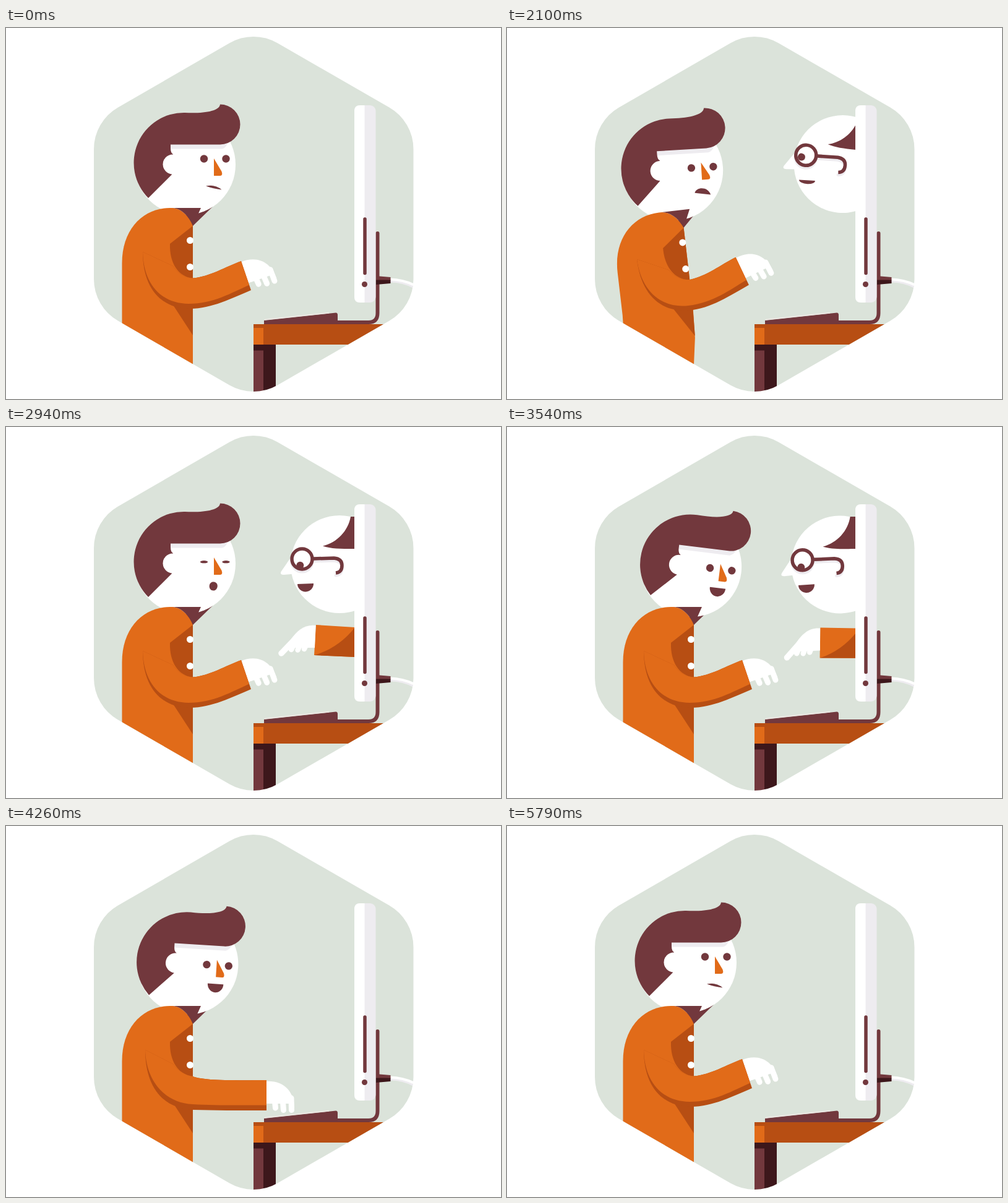
An HTML page that plays this animation: 800 by 600 pixels, repeating every 5.82 s.

```html
<!DOCTYPE html>
<html lang="en">
<head>
<meta charset="utf-8">
<title>Help from the screen</title>
<style>
  html, body { margin: 0; width: 100%; height: 100%; overflow: hidden; background: #fff; }
  svg { display: block; width: 800px; height: 600px; }
  .white { fill: #fff; }
  .pale { fill: #eeecf0; }
  .orange { fill: #e16b19; }
  .rust { fill: #b74e13; }
  .brown { fill: #72383d; }
  .dark { fill: #3d171b; }
  .line { fill: none; stroke: #72383d; stroke-linecap: round; }
  .soft { fill: none; stroke: #eeecf0; stroke-linecap: round; }
  .finger { fill: none; stroke: #fff; stroke-linecap: round; }
</style>
</head>
<body>
<svg viewBox="0 0 800 600">
  <defs>
    <clipPath id="hex">
      <path d="M361 24.5 A78 78 0 0 1 439 24.5 L619.5 128.5 A78 78 0 0 1 658.5 196 V406 A78 78 0 0 1 619.5 473.5 L439 577.5 A78 78 0 0 1 361 577.5 L181 473.5 A78 78 0 0 1 142 406 V196 A78 78 0 0 1 181 128.5 Z"/>
    </clipPath>
    <clipPath id="screen"><rect width="564" height="600"/></clipPath>
    <clipPath id="lens"><circle cx="478.5" cy="213.5" r="16"/></clipPath>
  </defs>

  <g clip-path="url(#hex)">
    <rect width="800" height="600" fill="#dbe3da"/>

    <!-- desk -->
    <path class="orange" d="M400 479H416V512H400Z"/>
    <path class="rust" d="M400 479H680V512H416V485H400Z"/>
    <path class="brown" d="M400 512H416V600H400Z"/>
    <path class="dark" d="M400 512H436V600H416V521.5H400Z"/>

    <!-- helper -->
    <g clip-path="url(#screen)">
      <g id="helper">
        <path class="white" d="M463 207L444.5 234Q442 239 449 239L472 237Z"/>
        <circle class="white" cx="539" cy="222" r="79"/>
        <path class="brown" d="M512 192.500C535 187 553 168 557 145L700 145V197H563C540 197 525 197 512 192.500Z"/>
        <g id="frameShade" class="soft" stroke-width="5" transform="translate(0 4)">
          <circle cx="478.500" cy="213.500" r="16.500"/>
          <path d="M497 213L530 212Q543 213 543 224Q543 235 533 236"/>
        </g>
        <circle class="white" cx="478.500" cy="213.500" r="16.500"/>
        <g clip-path="url(#lens)"><circle id="pupil" class="brown" r="6"/></g>
        <g class="line" stroke-width="5.500">
          <circle cx="478.500" cy="213.500" r="16.500"/>
          <path d="M497 213L530 212Q543 213 543 224Q543 235 533 236" stroke-linecap="butt"/>
        </g>
        <path id="helperMouth" class="brown"/>
      </g>
      <g id="pointer">
        <path class="orange" d="M501 320L564 324L700 332V380L564 372L498 369Z"/>
        <path class="rust" d="M498 369Q537 358 564 324L700 310V380L564 372Z"/>
        <path class="white" d="M500.500 321C482 319 471 329 460 344L464 357L499 357Z"/>
        <path class="finger" stroke-width="9.500" d="M470 340L445 366"/>
        <path class="finger" stroke-width="8.500" d="M468 346L461 360M478 346L471.500 360.500M488 346L482 359"/>
      </g>
    </g>

    <!-- computer -->
    <path class="line" stroke-width="6" d="M536 476H586Q600.500 476 600.500 461V332"/>
    <path class="brown" d="M417 479V473L533 460.500Q536 460.500 536 464V473H560V479Z"/>
    <path d="M418 471.500L522 460.500" stroke="#ebe7e2" stroke-width="2"/>
    <rect class="pale" x="563" y="125" width="34.500" height="319" rx="9"/>
    <path class="white" d="M579.500 125H572Q563 125 563 134V435Q563 444 572 444H579.500Z"/>
    <path class="line" stroke-width="5.500" d="M580 309V396.500"/>
    <circle class="brown" cx="579.500" cy="414.500" r="4.500"/>
    <path class="soft" stroke-width="5" d="M621 409Q643 409 662 420"/>
    <path fill="none" stroke="#fff" stroke-width="4" d="M621 406.500Q643 407 662 417"/>
    <path class="brown" d="M598 401L621.500 403V408H598Z"/>
    <path class="dark" d="M598 407.500H621.500V413L598 415Z"/>

    <!-- worker -->
    <path id="collarBack" class="brown"/>
    <g id="head">
      <circle class="white" cx="289.500" cy="221" r="81.500"/>
      <path class="pale" d="M266 187H358Q355 194 349 195.500H266Z"/>
      <path class="brown" d="M346 188.500A32.500 32.500 0 0 0 346 123.500C345 135 318 138.500 289 137A81 81 0 0 0 230 275L268 237L270 204Q266 202 266 194V188.500Z"/>
      <circle class="white" cx="269.500" cy="220.500" r="16"/>
      <path class="orange" d="M336 211L348.500 232Q351 239 346 239H336Z"/>
      <ellipse id="eyeL" class="brown" cx="320" rx="6.200"/>
      <ellipse id="eyeR" class="brown" cx="355.500" rx="6.200"/>
      <path id="mouth" class="brown"/>
    </g>
    <path id="torso" class="orange"/>
    <path id="chestShade" class="rust"/>
    <path id="hipShade" class="rust"/>
    <path id="collar" class="brown"/>
    <circle id="button1" class="white" r="5.500"/>
    <circle id="button2" class="white" r="5.500"/>
    <g id="hand">
      <path class="white" d="M419 413C450 411 466 430 466 457L457 449H419Z"/>
      <path class="finger" stroke-width="9" d="M461 440L461.500 459.500M447 440L448.500 459.500M434 440L435.500 456"/>
    </g>
    <path id="armShade" class="rust"/>
    <path id="arm" class="orange"/>
  </g>
</svg>

<script>
const LOOP = 5820;
const HIP = [320, 464], NECK = [255, 290];
const el = id => document.getElementById(id);
const set = (id, attrs) => {
  for (const name in attrs) el(id).setAttribute(name, attrs[name]);
};
const clamp = v => Math.max(0, Math.min(1, v));
const lerp = (a, b, t) => a + (b - a) * t;

// Eased value from [time, value] keys.
function track(keys, t) {
  let i = 0;
  while (i < keys.length - 1 && keys[i + 1][0] <= t) i++;
  const [t0, v0] = keys[i], [t1, v1] = keys[Math.min(i + 1, keys.length - 1)];
  const p = t1 > t0 ? clamp((t - t0) / (t1 - t0)) : 0;
  return lerp(v0, v1, p * p * (3 - 2 * p));
}

// 0 at the origin, 1 half a period later.
const wave = (t, origin, period) => .5 - .5 * Math.cos(2 * Math.PI * (t - origin) / period);

// The upper body turns about the hip; the turn fades out below it.
function bendPoint(x, y, lean) {
  const a = lean * clamp((545 - y) / 100) * Math.PI / 180;
  const dx = x - HIP[0], dy = y - HIP[1], c = Math.cos(a), s = Math.sin(a);
  return [HIP[0] + dx * c + dy * s, HIP[1] - dx * s + dy * c];
}
const bend = (d, lean) => d.replace(/(-?[\d.]+) (-?[\d.]+)/g, (m, x, y) =>
  bendPoint(+x, +y, lean).map(v => v.toFixed(2)).join(' '));

function mix(a, b, t) {
  const other = b.match(/-?[\d.]+/g);
  let i = 0;
  return a.replace(/-?[\d.]+/g, n => lerp(+n, +other[i++], t).toFixed(2));
}

const body = {
  collarBack: 'M270 291L334 289L302 320Z',
  collar: 'M270 291L315 291L302 320C297 307 286 293 270 291Z',
  torso: 'M187.5 600L187.5 545L187.5 500L187.5 450L187.5 380C187.5 325 222 291 265 291L270 291C286 293 297 307 302 320L302 400L302 450L302 500L302 545L302 600Z',
  chestShade: 'M302 320L265 349C264 380 278 402 302 405Z',
  hipShade: 'M270 448L302 497L302 440Z'
};

const armTop = {
  up: 'M221 362L270 385Q283 404 302 404.5C330 402 355 386 380 377',
  down: 'M225 362L270 385Q283 402 302 405C320 411 345 411.5 421 411'
};
const sleeve = {
  up: armTop.up + 'L393 415.5C365 428 335 446 295 446C252 446 222 415 221 362Z',
  down: armTop.down + 'L421 451.5C375 451.5 335 452 302 450C255 448 226 410 225 362Z'
};
const sleeveShade = {
  up: armTop.up + 'L396 424C365 437 330 455 295 454C250 453 221 420 221 362Z',
  down: armTop.down + 'L421 460C375 460 335 460 302 459C252 457 225 420 225 362Z'
};

const mouths = {
  flat: 'M323 255.5Q338 252.500 348.500 261.500Q335 260 323 255.5Z',
  sad: 'M323 259.500C326 250 345 250 348.500 264Z',
  round: 'M335 250.500C345 250.500 343 264.500 335 264.500C326.500 264.500 326.500 250.500 335 250.500Z',
  smile: 'M323.500 250H349A12.750 14 0 0 1 323.500 250Z'
};
function mouthAt(t) {
  if (t < 720 || t >= 5430) return mouths.flat;
  if (t < 2760) return mouths.sad;
  return t < 3060 ? mouths.round : mouths.smile;
}

const keys = {
  lean: [[1850, 0], [1990, 11], [2100, 6.6], [2330, 0]],
  head: [[600, 0], [900, 14.5], [1820, 14.5], [1930, -14], [2000, -12], [2100, -3.5], [2350, 0],
         [3000, 0], [3300, 7], [3650, 7], [4150, 3.7], [5200, 3.7], [5480, 0]],
  eyeDrop: [[600, 0], [900, 3.5], [1820, 3.5], [1950, 7.5], [2900, 6.500], [3100, 8], [5250, 8.500], [5480, 0]],
  lids: [[650, 1], [900, .66], [1800, .66], [1900, 1], [2850, 1], [2920, .35], [2960, .35], [3030, 1],
         [4600, 1], [4670, .2], [4740, 1]],
  reach: [[30, 0], [200, 1], [560, 1], [780, 0], [3980, 0], [4220, 1], [5250, 1], [5520, 0]],
  helperX: [[1860, 135], [1980, -4], [2080, 0], [3780, 0], [4060, 135]],
  helperTurn: [[2150, 5.5], [2500, 0], [3000, 0], [3500, -1.200]],
  pupilX: [[2150, -7], [2600, -3.5], [3500, -2.500]],
  pupilY: [[2150, 3.5], [2600, 9.5], [3500, 11.5]],
  pointer: [[2400, 135], [2660, -4], [2760, 0], [3640, 0], [3860, 135]]
};

function drawWorker(t) {
  const lean = track(keys.lean, t);
  for (const id in body) set(id, { d: bend(body[id], lean) });
  [343.5, 386.5].forEach((y, i) => {
    const [cx, cy] = bendPoint(297.5, y, lean);
    set('button' + (i + 1), { cx, cy });
  });

  const [nx, ny] = bendPoint(...NECK, lean);
  const dx = nx - NECK[0] + lean * .3, dy = ny - NECK[1] + lean * .4;
  set('head', { transform: `translate(${dx} ${dy}) rotate(${track(keys.head, t)} ${NECK})` });
  const cy = 211.5 + track(keys.eyeDrop, t), ry = 6.2 * track(keys.lids, t);
  set('eyeL', { cy, ry });
  set('eyeR', { cy, ry });
  set('mouth', { d: mouthAt(t) });

  const reach = track(keys.reach, t) * (1 - .12 * wave(t, 4260, 210));
  const [hx, hy] = bendPoint(lerp(388, 421, reach), lerp(400, 436, reach), lean);
  const turn = -19 * (1 - reach) - lean;
  set('hand', { transform: `translate(${hx} ${hy}) rotate(${turn}) translate(-421 -436)` });
  set('armShade', { d: bend(mix(sleeveShade.up, sleeveShade.down, reach), lean) });
  set('arm', { d: bend(mix(sleeve.up, sleeve.down, reach), lean) });
}

function drawHelper(t) {
  set('helper', {
    transform: `translate(${track(keys.helperX, t)} 0) rotate(${track(keys.helperTurn, t)} 561 259)`
  });
  set('pupil', { cx: 478.5 + track(keys.pupilX, t), cy: 213.5 + track(keys.pupilY, t) });
  const open = t < 2400 ? 6 : 13 - 7 * wave(t, 2940, 300);
  set('helperMouth', { d: `M471 254L497 253A13 ${open} 0 0 1 471 254Z` });

  const nod = wave(t, 2940, 400);
  const x = track(keys.pointer, t) + 6.5 * nod;
  set('pointer', { transform: `translate(${x} ${4.5 * nod}) rotate(${-2.5 * nod} 500 345)` });
}

function frame() {
  const t = performance.now() % LOOP;
  drawWorker(t);
  drawHelper(t);
  requestAnimationFrame(frame);
}
frame();
</script>
</body>
</html>
```
